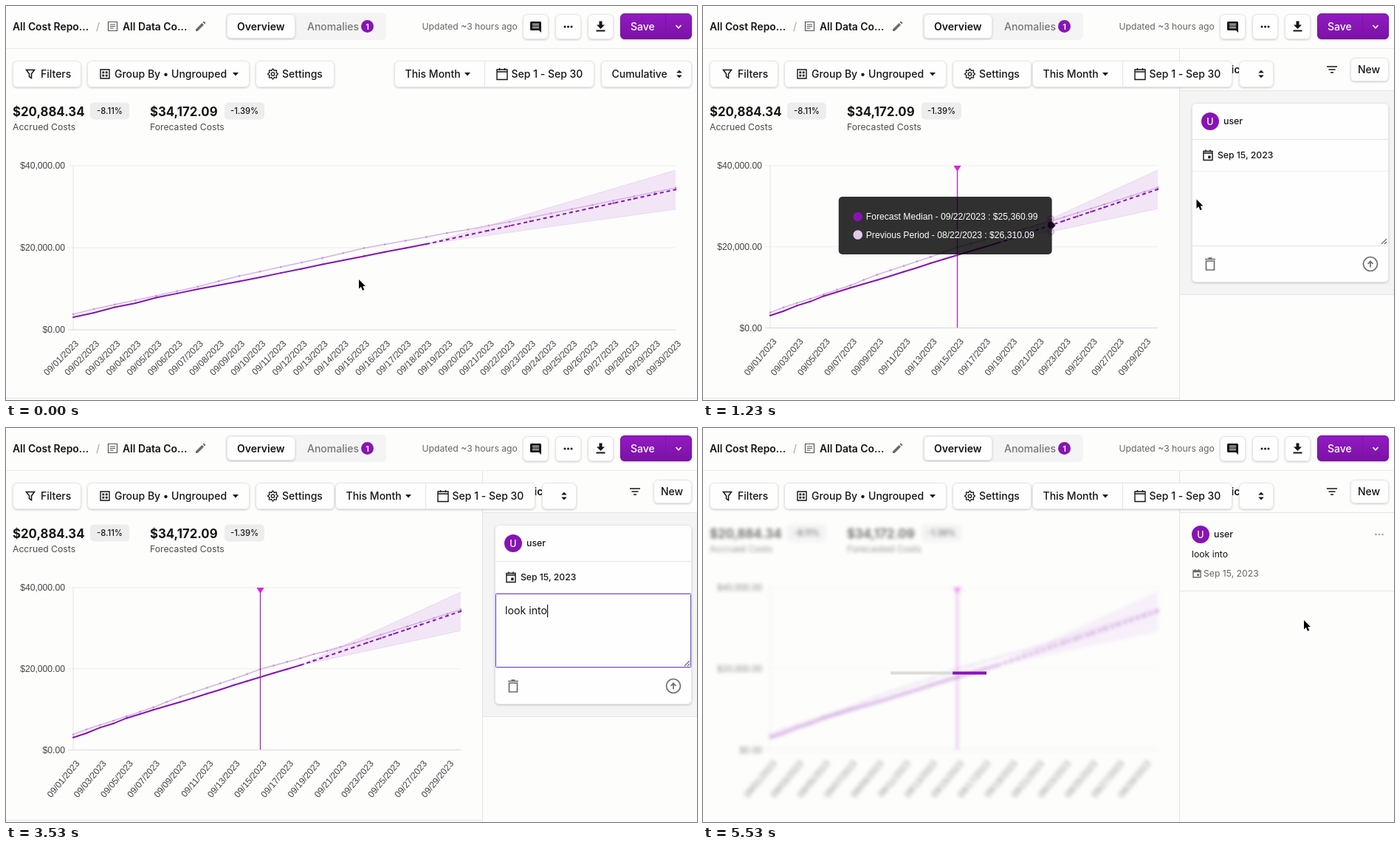
An HTML page with a canvas that plays this animation: 936 px wide and 533 px high, repeating every 5560 ms.

```html
<!DOCTYPE html>
<html lang="en">
<head>
<meta charset="utf-8">
<title>Cost report</title>
<style>
html, body { margin: 0; width: 100%; height: 100%; overflow: hidden; background: #fdfdfc; }
canvas { display: block; }
</style>
</head>
<body>
<canvas width="936" height="533"></canvas>
<script>
const LOOP = 5560, HOVER = 296, OPEN = 960, FOCUS = 1750, TYPE = 2240, KEY = 140, SUBMIT = 4700, RELOAD = 5080;
const PAGE = '#fdfdfc', CARD = '#fefefe', INK = '#151515', GREY = '#666666', LINE = '#e4e4e4',
      SHADE = '#f4f4f4', PURPLE = '#8714b4', LILAC = '#d6b4e2', TIP = 'rgba(0,0,0,.81)';
const INTER = 'Inter, sans-serif', ARIAL = '"Liberation Sans", Arial, sans-serif';
const NOTE = 'look into', NOTE_DATE = 'Sep 15, 2023';

const main = document.querySelector('canvas').getContext('2d');
const layer = new OffscreenCanvas(936, 533).getContext('2d');
let g = main;

const saveFill = main.createLinearGradient(0, 10, 0, 45);
saveFill.addColorStop(0, '#921bc2');
saveFill.addColorStop(1, '#7b11a6');

// Daily values in thousands of dollars
const costs = [3.06, 4.15, 5.5, 6.5, 7.85, 8.85, 9.9, 10.85, 11.8, 12.8, 13.85, 14.85,
  15.95, 16.95, 17.945, 18.95, 19.9, 20.884];
const previous = [3.8, 5.05, 6.15, 7.2, 8.3, 9.4, 10.5, 11.85, 13.1, 14.2, 15.3, 16.4, 17.5,
  18.7, 19.906, 20.8, 21.7, 22.6, 23.6, 24.4, 25.4, 26.31];
while (previous.length < 30) previous.push(previous.at(-1) + 1.036);
const forecast = end => Array.from({ length: 13 }, (_, i) => 20.884 + (end - 20.884) * i / 12);
const median = forecast(34.172), upper = forecast(38.9), lower = forecast(29.4);

const clamp = v => Math.min(1, Math.max(0, v));
const mix = (a, b, p) => a + (b - a) * p;
const outQuart = p => 1 - (1 - clamp(p)) ** 4;

function text(s, x, y, size, color = INK, weight = 400, align = 'left', family = INTER) {
  g.font = `${weight} ${size}px ${family}`;
  g.textAlign = align;
  g.fillStyle = color;
  g.fillText(s, x, y);
}

function box(x, y, w, h, r, fill, stroke) {
  g.beginPath();
  g.roundRect(x, y, w, h, r);
  if (fill) { g.fillStyle = fill; g.fill(); }
  if (stroke) { g.strokeStyle = stroke; g.lineWidth = 1; g.stroke(); }
}

function disc(x, y, r, color) {
  g.beginPath();
  g.arc(x, y, r, 0, 7);
  g.fillStyle = color;
  g.fill();
}

function path(d, x, y, color = INK, width = 0) {
  const p = new Path2D(d);
  g.save();
  g.translate(x, y);
  g.fillStyle = g.strokeStyle = color;
  g.lineWidth = width;
  width ? g.stroke(p) : g.fill(p);
  g.restore();
}

const rule = (x1, y1, x2, y2, color = LINE, width = 1) => path(`M${x1} ${y1}L${x2} ${y2}`, 0, 0, color, width);

function button(x, y, w, h, fill = CARD) {
  g.save();
  g.shadowColor = 'rgba(0,0,0,.2)';
  g.shadowBlur = 2.5;
  g.shadowOffsetY = 1;
  box(x, y, w, h, 6, fill);
  g.restore();
  box(x + .5, y + .5, w - 1, h - 1, 6, null, fill === CARD ? '#e6e6e4' : '#7b12a4');
}

const caretDown = (x, y) => path('M-4 -2H4L0 2.5z', x, y);
const label = (s, x, y = 97, color = INK) => text(s, x, y, 14, color, 500);

function calendar(x, y, w, h, color, mark) {
  path(`M0 2H${w}V${h}H0zM0 ${h * .32}H${w}M${w * .25} 0V3M${w * .75} 0V3`, x, y, color, 1.4);
  if (mark) { g.fillStyle = color; g.fillRect(x + w * .52, y + h * .58, w * .28, h * .25); }
}

function gear(x, y) {
  g.beginPath();
  for (let a = 0; a < 2 * Math.PI; a += Math.PI / 32) {
    const r = 5.9 + Math.cos(a * 8);
    g.lineTo(x + r * Math.cos(a), y + r * Math.sin(a));
  }
  g.closePath();
  g.moveTo(x + 2.2, y);
  g.arc(x, y, 2.2, 0, 2 * Math.PI);
  g.strokeStyle = INK;
  g.lineWidth = 1.3;
  g.stroke();
}

function header() {
  text('All Cost Repo...', 9, 32.5, 13.9, INK, 600);
  text('/', 122, 32.5, 14.2, '#a3a3a3');
  path('M0 0H12V12H0zM2.5 3.5H9.5M2.5 6H9.5M2.5 8.5H7', 138.5, 21.5, '#555', 1.2);
  text('All Data Co...', 158, 32.5, 13.9, INK, 600);
  path('M0 10.5L8.5 2L11 4.5L2.5 13H0zM9.5 1L11 -.5L13.5 2L12 3.5z', 257, 21, '#6b6b6b');

  box(297, 9, 218, 37, 6, SHADE);
  button(299, 11, 93, 33);
  text('Overview', 313, 32.5, 14, INK, 600);
  label('Anomalies', 408, 32.5, '#777');
  disc(489.5, 27.5, 8.5, PURPLE);
  text('1', 489.5, 31.5, 11, '#fff', 600, 'center');
  text('Updated ~3 hours ago', 563.5, 32, 12.2, GREY);

  for (const x of [700, 744, 788]) button(x, 11, 35, 34);
  path('M0 1.5Q0 0 1.5 0H13.5Q15 0 15 1.5V15L12 12H1.5Q0 12 0 10.5z', 710, 21);
  path('M3 3.5H12M3 6H12M3 8.5H12', 710, 21, CARD, 1.2);
  for (const x of [757, 761.5, 766]) disc(x, 28, 1.5, INK);
  path('M4 0H8V5H11.5L6 10.5L.5 5H4zM0 12H12V14H0z', 799.5, 20.5);

  button(832, 10, 97, 35, saveFill);
  text('Save', 846, 32.5, 14, '#fff', 500);
  rule(893.5, 11, 893.5, 44, '#7d149f');
  path('M-3.5 -2L0 1.8L3.5 -2', 911, 28, '#fff', 1.6);
  rule(0, 57.5, 936, 57.5, '#ececea');
}

function toolbar(open) {
  const dx = open ? -80 : 0;
  button(9, 74, 93, 36);
  path('M.5 .5H11.5L7.5 5.8V11.5L4.5 9.5V5.8z', 27, 86, INK, 1.5);
  label('Filters', 47);
  button(110, 74, 220, 36);
  path('M0 0H12V12H0z', 128, 86, INK, 1.4);
  path('M2.4 2.4H5.2V5.2H2.4zM6.8 2.4H9.6V5.2H6.8zM2.4 6.8H5.2V9.6H2.4zM6.8 6.8H9.6V9.6H6.8z', 128, 86);
  label('Group By • Ungrouped', 147);
  caretDown(311, 92);
  button(338, 74, 107, 36);
  gear(361.5, 92);
  label('Settings', 374);

  button(526 + dx, 74, 271, 36);
  rule(648.5 + dx, 75, 648.5 + dx, 109);
  label('This Month', 540.5 + dx);
  caretDown(625 + dx, 92);
  calendar(665 + dx, 84, 14, 15.5, INK);
  label('Sep 1 - Sep 30', 684.5 + dx);

  const x = open ? 726 : 806;
  button(x, 74, open ? 47 : 123, 36);
  if (!open) label('Cumulative', 820.5);
  path('M-3.8 -1.5H3.8L0 -5.2zM-3.8 1.5H3.8L0 5.2z', open ? 756 : 912, 92);
}

function stats() {
  const stat = (x, value, name, badgeX, badgeW, change) => {
    text(value, x, 148.5, 16.8, INK, 700);
    text(name, x, 168, 12.2, '#4c4c4c');
    box(badgeX, 130.5, badgeW, 23, 5, '#ededed');
    text(change, badgeX + badgeW / 2, 146, 11.2, INK, 500, 'center');
  };
  stat(9, '$20,884.34', 'Accrued Costs', 114, 53, '-8.11%');
  stat(195, '$34,172.09', 'Forecasted Costs', 296, 54, '-1.39%');
}

function scales(open) {
  const right = open ? 616 : 907, base = open ? 435.5 : 438, unit = open ? 5.4875 : 5.55;
  return { right, X: i => 91 + i * (right - 91) / 29, Y: v => base - v * unit };
}

function chart(open) {
  const { right, X, Y } = scales(open);
  const series = (data, from, color, width, dash = [], dots = 0, dotColor = color) => {
    g.beginPath();
    data.forEach((v, i) => g.lineTo(X(from + i), Y(v)));
    g.strokeStyle = color;
    g.lineWidth = width;
    g.setLineDash(dash);
    g.stroke();
    g.setLineDash([]);
    if (dots) data.forEach((v, i) => disc(X(from + i), Y(v), dots, dotColor));
  };

  for (const k of [0, 20, 40]) {
    rule(84, Y(k), right, Y(k), k ? '#eeeee2' : '#d9d9de');
    text(`$${k ? k + ',000' : 0}.00`, 80, Y(k) + 4.2, 12.15, '#444', 400, 'right', ARIAL);
  }
  rule(91, Y(40), 91, Y(0), '#e4e4e0');

  for (let i = 0; i < 30; i += open ? 2 : 1) {
    g.save();
    g.translate(X(i) + (open ? 6 : 5), open ? 451.5 : 454.5);
    g.rotate(-(open ? 50 : 45) * Math.PI / 180);
    text(`09/${String(i + 1).padStart(2, '0')}/2023`, 0, 4.2, 12.15, '#444', 400, 'right', ARIAL);
    g.restore();
  }

  g.beginPath();
  upper.forEach((v, i) => g.lineTo(X(17 + i), Y(v)));
  g.lineTo(right, Y(lower[12]));
  g.closePath();
  g.fillStyle = 'rgba(165,70,200,.12)';
  g.fill();
  series(upper, 17, '#dcbce8', 1, [1, 1]);
  series(lower, 17, '#dcbce8', 1, [1, 1]);
  series(previous, 0, LILAC, 1.6, [], 1.3, '#bd98cc');
  series(median, 17, PURPLE, 2, [5, 4], 1.2);
  series(costs, 0, PURPLE, 2, [], 1.1);

  if (open) {
    rule(344.5, 217, 344.5, 435, '#a918c0', 1.2);
    path('M-5 0H5L0 8z', 344.5, 216, '#e41ee2');
  }
}

function tooltip(x, y, w, alpha, rows, leftCaret) {
  g.save();
  g.globalAlpha = alpha;
  box(x, y, w, 78, 5, TIP);
  path(leftCaret ? 'M0 -5L-5 0L0 5z' : 'M0 -5L5 0L0 5z', leftCaret ? x : x + w, y + 39, TIP);
  rows.forEach(([color, s], i) => {
    disc(x + 26, y + 27 + i * 24.5, 6.3, color);
    text(s, x + 37, y + 31 + i * 24.5, 12.15, '#fff', 400, 'left', ARIAL);
  });
  g.restore();
}

function tooltips(t) {
  if (t < HOVER || t > 1430) return;
  const open = t >= OPEN, { X, Y } = scales(open);
  const fade = open ? 1 - clamp((t - 1230) / 200) : clamp((t - HOVER) / 200);
  g.globalAlpha = fade;
  if (open) {
    for (const v of [upper[4], lower[4]]) {
      g.beginPath();
      g.arc(X(21), Y(v), 4, 0, 7);
      g.strokeStyle = '#c08fd0';
      g.lineWidth = 1.2;
      g.stroke();
    }
    disc(X(21), Y(26.31), 4, LILAC);
    disc(X(21), Y(25.361), 4.5, '#560a72');
  } else {
    disc(X(14), Y(19.906), 4, LILAC);
    disc(X(14), Y(17.945), 4.5, '#560a72');
  }
  g.globalAlpha = 1;
  if (open) {
    const p = outQuart((t - 994) / 400);
    tooltip(mix(492, 175, p), mix(294, 257, p), mix(285, 289, p), fade, [
      [PURPLE, 'Forecast Median - 09/22/2023 : $25,360.99'],
      ['#e3c9ec', 'Previous Period - 08/22/2023 : $26,310.09']], false);
  } else {
    const p = outQuart((t - HOVER) / 400);
    tooltip(mix(284, 492, p), mix(243, 294, p), 285, fade, [
      ['#e3c9ec', 'Previous Period - 08/15/2023 : $19,905.69'],
      ['#a92fd0', 'Costs - 09/15/2023 : $17,945.42']], true);
  }
}

function person(x, y) {
  disc(x, y, 12, PURPLE);
  text('U', x, y + 4.5, 12.5, '#fff', 500, 'center');
  text('user', x + 18, y + 4, 12.3, INK, 500);
}

function editor(t) {
  g.fillStyle = SHADE;
  g.fillRect(646, 115, 290, 275);
  rule(646, 390.5, 936, 390.5);
  button(662, 131, 267, 243);
  person(687, 156);
  rule(663, 180.5, 928, 180.5);
  calendar(678, 194.5, 12, 14, INK, true);
  text(NOTE_DATE, 697, 206, 12.2, INK, 500);

  if (t < FOCUS) {
    rule(663, 223.5, 928, 223.5, '#eeeeea');
    rule(663, 324.5, 928, 324.5);
  } else {
    box(662.5, 223.5, 266, 101, 2, null, '#dcc6ee');
    box(663.5, 224.5, 264, 99, 1, CARD, '#6a58c4');
    const count = Math.min(NOTE.length, Math.max(0, Math.floor((t - TYPE) / KEY) + 1));
    const typed = NOTE.slice(0, count);
    text(typed, 676, 252, 14.2);
    const idle = t - (count ? TYPE + (count - 1) * KEY : FOCUS);
    if (idle % 1000 < 500) {
      const x = 676.5 + g.measureText(typed).width;
      rule(x, 239, x, 256, INK, 1.2);
    }
  }
  path('M0 7L7 0M4 7L7 4', 919, 315, '#666', 1.1);
  path('M1.5 4H12.5V16H1.5zM0 1.5H14M4.5 0H9.5', 680, 341, '#6e6e6e', 1.7);
  path('M9.5 0A9.5 9.5 0 1 1 -9.5 0A9.5 9.5 0 1 1 9.5 0M0 4.5V-3.5M-3.5 0L0 -3.7L3.5 0', 904, 349, '#6e6e6e', 1.7);
}

function savedNote() {
  person(674, 144);
  for (const x of [911.5, 916, 920.5]) disc(x, 144, 1.3, '#a3a3a3');
  text(NOTE, 662, 175, 12.2);
  calendar(664, 191, 10, 11, GREY, true);
  text(NOTE_DATE, 678, 201, 12.2, GREY);
  rule(646, 220.5, 936, 220.5);
}

function panel(t) {
  g.fillStyle = PAGE;
  g.fillRect(646, 58, 290, 475);
  rule(645.5, 58, 645.5, 533);
  rule(646, 114.5, 936, 114.5);
  text('ic', 715.5, 91, 14.2, INK, 600);
  path('M-7 -4H7M-4.5 0H4.5M-2 4H2', 852, 86, INK, 1.5);
  button(877, 70, 52, 32);
  label('New', 887, 91);
  t < SUBMIT ? editor(t) : savedNote();
}

function loader(t) {
  const p = clamp((t - RELOAD) / 1000), x = 254 + 130 * (-.4 + 1.4 * (1 - (1 - p) ** 2.3));
  const from = Math.max(254, x), to = Math.min(384, x + 52);
  g.fillStyle = '#dcdcd8';
  g.fillRect(254, 329.5, 130, 4);
  g.fillStyle = PURPLE;
  g.fillRect(from, 329.5, Math.max(0, to - from), 4);
}

const track = [[0, 478, 370], [300, 478, 370], [420, 478, 367], [990, 478, 367],
  [1230, 668.5, 261.5], [1550, 690, 258], [3700, 690, 258], [4400, 901, 349],
  [4950, 901, 349], [5530, 814, 260], [LOOP, 814, 260]];

function pointer(t) {
  if (t > 2230 && t < 3700) return;
  const i = track.findIndex(k => k[0] > t), [t0, x0, y0] = track[i - 1], [t1, x1, y1] = track[i];
  const p = (t - t0) / (t1 - t0), e = p * p * (3 - 2 * p);
  const x = mix(x0, x1, e), y = mix(y0, y1, e);
  if (t > 1300 && t < SUBMIT && y < 324) {
    path('M-3 -8Q0 -8 0 -6Q0 -8 3 -8M0 -6V6M-3 8Q0 8 0 6Q0 8 3 8', x, y, INK, 1.2);
    return;
  }
  const arrow = 'M0 0V12.5L2.9 9.8L5 14.8L7.3 13.8L5.2 9H9z';
  path(arrow, x, y, '#fff', 2);
  path(arrow, x, y, '#000');
}

function draw() {
  const t = performance.now() % LOOP, open = t >= OPEN, loading = t >= RELOAD;
  g = layer;
  g.clearRect(0, 0, 936, 533);
  stats();
  chart(open);

  g = main;
  g.fillStyle = PAGE;
  g.fillRect(0, 0, 936, 533);
  g.save();
  if (loading) {
    g.filter = 'blur(2.5px)';
    g.globalAlpha = .6;
  }
  g.drawImage(layer.canvas, 0, 0);
  g.restore();
  if (!loading) rule(0, 530.5, open ? 645 : 936, 530.5);
  header();
  if (open) panel(t);
  toolbar(open);
  tooltips(t);
  if (loading) loader(t);
  pointer(t);
  requestAnimationFrame(draw);
}
draw();
</script>
</body>
</html>
```
